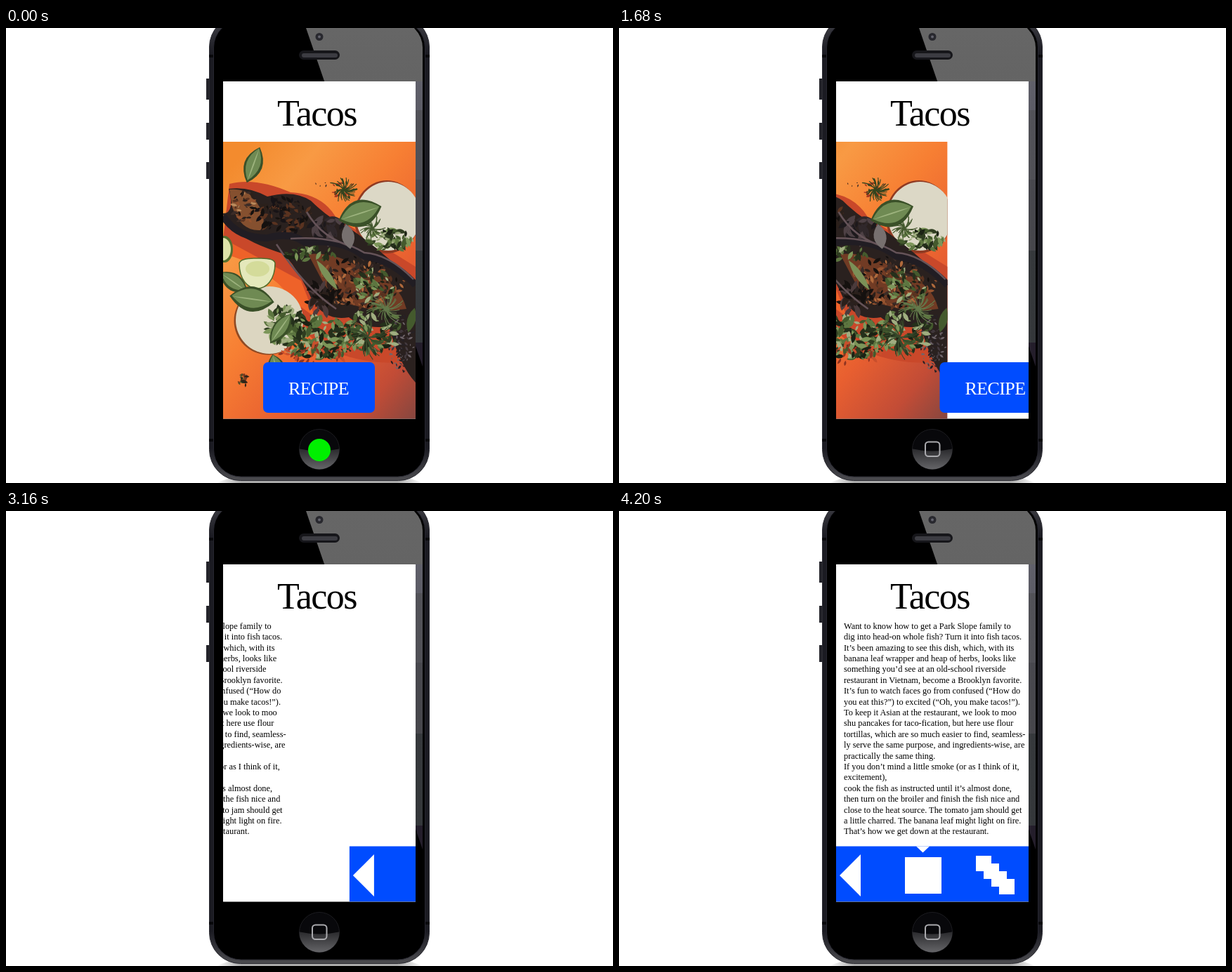
An HTML page that plays this animation: 864 px wide and 648 px high, repeating every 4800 ms.

```html
<!DOCTYPE html>
<html lang="en">
<head>
<meta charset="utf-8">
<title>Taco recipe on a phone</title>
<style>
  html, body { margin: 0; width: 100%; height: 100%; overflow: hidden; background: #fff; }
  svg { display: block; width: 864px; height: 648px; }
  text { font-family: "Liberation Serif", "Times New Roman", serif; }
</style>
</head>
<body>
<svg viewBox="0 0 864 648">
  <defs>
    <clipPath id="screen"><rect x="309" y="76" width="274" height="480.500"/></clipPath>
    <clipPath id="photoBox"><rect x="309" y="162" width="274" height="395"/></clipPath>
    <clipPath id="face"><rect x="297" y="-10" width="296" height="648" rx="38"/></clipPath>
    <clipPath id="home"><circle cx="446" cy="600" r="28.5"/></clipPath>
    <linearGradient id="gloss" gradientUnits="userSpaceOnUse" x1="0" y1="0" x2="0" y2="500">
      <stop offset="0" stop-color="#666"/><stop offset=".152" stop-color="#646464"/>
      <stop offset=".152" stop-color="#60606a"/><stop offset=".234" stop-color="#5c5c66"/>
      <stop offset=".234" stop-color="#525258"/><stop offset=".432" stop-color="#505056"/>
      <stop offset=".432" stop-color="#48484e"/><stop offset=".634" stop-color="#46464b"/>
      <stop offset=".634" stop-color="#36393c"/><stop offset=".896" stop-color="#34373a"/>
      <stop offset=".896" stop-color="#241e2b"/>
    </linearGradient>
    <linearGradient id="edge" x2="0" y2="1">
      <stop offset="0" stop-color="#44444a"/><stop offset=".08" stop-color="#1b1b22"/>
      <stop offset=".93" stop-color="#1b1b22"/><stop offset="1" stop-color="#4c4c50"/>
    </linearGradient>
    <linearGradient id="shine" x2="0" y2="1">
      <stop offset="0" stop-color="#29292c"/><stop offset="1" stop-color="#68686b"/>
    </linearGradient>
    <linearGradient id="floor">
      <stop offset="0" stop-color="#fff"/><stop offset=".12" stop-color="#aaa"/>
      <stop offset=".88" stop-color="#aaa"/><stop offset="1" stop-color="#fff"/>
    </linearGradient>
    <linearGradient id="orange" x1=".15" y1="0" x2="1" y2="1">
      <stop offset="0" stop-color="#f38b2e"/><stop offset=".18" stop-color="#f89a44"/>
      <stop offset=".4" stop-color="#f77f33"/><stop offset=".65" stop-color="#e85f30"/>
      <stop offset=".85" stop-color="#c24c36"/><stop offset="1" stop-color="#86463f"/>
    </linearGradient>
  </defs>

  <!-- Phone -->
  <path d="M300 648Q320 638 340 642H552Q572 638 592 648Z" fill="url(#floor)"/>
  <path d="M285 72h6v30h-6zM285 135h6v24h-6zM285 191h6v24h-6z" fill="#24242a"/>
  <rect x="289.500" y="-17" width="313" height="661.500" rx="44" fill="url(#edge)" stroke="#2a2a31"/>
  <path d="M289 40h8M595 40h8M289 587h8M595 587h8" stroke="#08080b" stroke-width="4"/>
  <rect x="295.500" y="-11" width="301" height="650" rx="39" fill="#000" stroke="#26262f"/>
  <path d="M427 0L593 482V0Z" fill="url(#gloss)" clip-path="url(#face)"/>
  <circle cx="446" cy="12.500" r="5.500" fill="#28282e"/>
  <circle cx="446" cy="12.500" r="2" fill="#62626c"/>
  <rect x="417" y="32" width="58" height="13" rx="6.500" fill="#16161a"/>
  <rect x="421" y="36" width="51" height="6" rx="3" fill="#3c3c42"/>
  <circle cx="446" cy="600" r="28.500" fill="#08080b" stroke="#1c1c20"/>
  <path d="M416 599Q446 606 476 599V630H416Z" fill="url(#shine)" clip-path="url(#home)"/>
  <rect x="436" y="589.500" width="20.500" height="20.500" rx="4.500" fill="none" stroke="#aaaaae" stroke-width="2"/>

  <g clip-path="url(#screen)">
    <rect x="309" y="76" width="274" height="481" fill="#fff"/>
    <text x="386" y="139" font-size="52" letter-spacing="-1.500">Tacos</text>

    <g id="photo">
      <g clip-path="url(#photoBox)">
        <rect x="309" y="162" width="274" height="395" fill="url(#orange)"/>
        <path d="M318 222Q355 212 405 234Q450 236 470 270L583 340V475Q520 482 470 462Q400 430 420 390L309 300Z" fill="#c9482a"/>
        <path d="M309 300L420 360L440 412L410 390Q370 335 309 322Z" fill="#ee6229"/>
        <ellipse cx="542" cy="269" rx="47" ry="52" fill="#8f3a22"/>
        <ellipse cx="544" cy="268" rx="46" ry="49" fill="#dcd8c6"/>
        <circle cx="373" cy="417" r="48.500" fill="#8f4a24"/>
        <circle cx="375" cy="416" r="48" fill="#dcd6c1"/>
        <ellipse cx="311" cy="315" rx="12" ry="19" fill="#55702f"/>
        <ellipse cx="309" cy="315" rx="11" ry="16" fill="#dde2a8"/>
        <path d="M317 229Q345 225 372 240Q410 230 434 246Q460 272 490 286Q535 316 583 365V505Q560 480 545 425Q510 430 488 412Q455 418 436 388Q420 350 396 322Q345 306 325 288Q309 274 309 264Q326 264 317 229Z" fill="#2a211f"/>
        <path d="M318 230Q340 228 352 242Q375 270 362 288Q335 290 322 255Z" fill="#85502f"/>
        <path d="M430 322Q470 318 510 345Q560 360 570 400Q530 406 500 396Q465 390 448 356Z" fill="#713b24"/>
        <g id="meat"></g>
        <path d="M309 268Q330 300 372 299Q405 290 425 305Q480 300 510 325Q550 330 583 366" fill="none" stroke="#211d23" stroke-width="10"/>
        <path d="M428 262Q450 300 495 312M405 300Q470 295 510 320Q545 322 580 358M385 308Q425 370 470 400" fill="none" stroke="#655358" stroke-width="2.500"/>
        <g id="herbs"></g>
        <path d="M332 335Q334 327 358 328Q382 327 383 335C383 383 332 383 332 335Z" fill="#e4e8bb" stroke="#526d2b" stroke-width="1.500"/>
        <ellipse cx="358" cy="343" rx="17" ry="11" fill="#d4db9a"/>
        <g id="basil"></g>
      </g>
    </g>

    <g id="button">
      <rect x="366" y="476" width="159" height="72" rx="7" fill="#004cff"/>
      <text x="402" y="521.500" font-size="26" letter-spacing="-.6" fill="#fff">RECIPE</text>
    </g>

    <g id="story" font-size="12.350"></g>

    <g id="bar">
      <rect x="309" y="477.500" width="274" height="79" fill="#004cff"/>
      <path d="M314 519L344 489V549Z M407 493h52v52h-52Z" fill="#fff"/>
      <path d="M508 491h22v11h11v11h11v11h11v22h-22v-11h-11v-11h-11v-11h-11Z" fill="#fff"/>
      <path id="notch" d="M423 477.500h19l-9.500 9Z" fill="#fff"/>
    </g>
  </g>

  <circle id="dot" cx="446" r="16" fill="#00f000"/>
</svg>

<script>
const $ = id => document.getElementById(id);
const clamp = (v, lo = 0, hi = 1) => Math.min(hi, Math.max(lo, v));

const lines = `Want to know how to get a Park Slope family to
dig into head-on whole fish? Turn it into fish tacos.
It’s been amazing to see this dish, which, with its
banana leaf wrapper and heap of herbs, looks like
something you’d see at an old-school riverside
restaurant in Vietnam, become a Brooklyn favorite.
It’s fun to watch faces go from confused (“How do
you eat this?”) to excited (“Oh, you make tacos!”).
To keep it Asian at the restaurant, we look to moo
shu pancakes for taco-fication, but here use flour
tortillas, which are so much easier to find, seamless-
ly serve the same purpose, and ingredients-wise, are
practically the same thing.
If you don’t mind a little smoke (or as I think of it,
excitement),
cook the fish as instructed until it’s almost done,
then turn on the broiler and finish the fish nice and
close to the heat source. The tomato jam should get
a little charred. The banana leaf might light on fire.
That’s how we get down at the restaurant.`.split("\n");
$("story").innerHTML = lines
  .map((line, i) => `<text x="320" y="${(167.8 + 15.4 * i).toFixed(1)}">${line}</text>`)
  .join("");

let seed = 11;
const random = () => (seed = seed * 16807 % 2147483647) / 2147483647;
const pick = list => list[Math.floor(random() * list.length)];

const leaf = (x, y, length, width, angle, fill) =>
  `<path transform="translate(${x} ${y}) rotate(${angle})" fill="${fill}"
    d="M${-length} 0Q0 ${-width * 2} ${length} 0Q0 ${width * 2} ${-length} 0Z"/>`;

// A large leaf with a lit face and a dark midrib
const basilLeaf = (x, y, length, width, angle) =>
  leaf(x, y, length, width, angle, "#3a5028") +
  leaf(x, y - 1, length * .9, width * .75, angle, "#6f8a53") +
  leaf(x, y, length * .9, 1, angle, "#9db37e");

// Scatters small leaves inside an ellipse
function scatter(cx, cy, rx, ry, count, size, colors) {
  let out = "";
  for (let i = 0; i < count; i++) {
    const a = random() * 2 * Math.PI, r = Math.sqrt(random());
    const length = size * (.5 + random());
    out += leaf(cx + rx * r * Math.cos(a), cy + ry * r * Math.sin(a),
      length, length * .4, random() * 360, pick(colors));
  }
  return out;
}

// Fans fine dill fronds out from one point
function dill(x, y, radius, color) {
  let d = "";
  for (let i = 0; i < 34; i++) {
    const a = random() * 2 * Math.PI, r = radius * (.5 + random() * .5);
    d += `M${x} ${y}q${r * Math.cos(a + .5) / 2} ${r * Math.sin(a + .5) / 2} ${r * Math.cos(a)} ${r * Math.sin(a)}`;
  }
  return `<path d="${d}" fill="none" stroke="${color}" stroke-width="1.1"/>`;
}

const greens = ["#25301b", "#2f3d20", "#445a2d", "#5d7640", "#7c9659", "#1b2214", "#a0ad80"];
const chars = ["#15110f", "#2b201b", "#5a3320", "#96532f", "#3c2c27"];
const ash = ["#262125", "#6f656a", "#443b40"];

$("meat").innerHTML =
  scatter(340, 255, 18, 22, 50, 3.5, [...chars, "#b98a5c"]) +
  scatter(395, 267, 40, 26, 110, 5, [...chars.slice(0, 3), "#171316"]) +
  scatter(455, 285, 30, 16, 30, 8, ["#1d191c", "#4e4145", "#30282b"]) +
  scatter(505, 362, 62, 36, 190, 4.5, [...chars, "#b06a3c"]) +
  scatter(452, 385, 24, 24, 45, 7, [...chars.slice(0, 2), "#4b3b3c"]) +
  scatter(563, 450, 18, 42, 110, 2.5, ash);

$("herbs").innerHTML =
  scatter(548, 302, 32, 14, 60, 6, greens) +
  scatter(432, 322, 36, 10, 40, 5, greens) +
  scatter(525, 368, 28, 22, 55, 5.5, greens) +
  scatter(398, 425, 27, 30, 75, 7, greens) +
  scatter(446, 440, 62, 30, 190, 6.5, greens) +
  scatter(440, 462, 55, 16, 45, 4, ["#c94f2c", "#8f3420"]) +
  scatter(524, 430, 36, 36, 85, 6, greens) +
  scatter(338, 502, 8, 9, 12, 4, ["#7c3b20", "#46552a", "#2e2418"]) +
  scatter(450, 222, 9, 8, 5, 1.5, chars) +
  scatter(480, 230, 16, 12, 20, 3, ["#a83a20", "#33421f"]) +
  dill(480, 230, 22, "#34441f") + dill(522, 285, 20, "#45592f") +
  dill(540, 400, 30, "#62784a") + dill(515, 440, 34, "#37492a");

$("basil").innerHTML =
  basilLeaf(352, 195, 27, 13, -70) +
  basilLeaf(504, 264, 32, 19, -18) +
  leaf(487, 297, 18, 9, 80, "#77706f") +
  basilLeaf(324, 362, 24, 12, 35) + basilLeaf(350, 386, 32, 18, 8) +
  leaf(457, 352, 26, 5, 55, "#7b9057") + basilLeaf(391, 428, 26, 11, -55) +
  basilLeaf(385, 486, 22, 13, 75) + leaf(577, 416, 18, 6, -75, "#445a2d");

const place = (id, x, y = 0) => $(id).setAttribute("transform", `translate(${x} ${y})`);
const show = (id, on) => $(id).style.display = on ? "" : "none";

function draw() {
  const t = Math.floor(performance.now() % 4800 / 40) * 40;

  // Finger dot travels from the home button to RECIPE and presses it
  const travel = clamp((t - 40) / 1000);
  show("dot", t < 1240);
  $("dot").setAttribute("cx", 446 - travel);
  $("dot").setAttribute("cy", 601 - 89.3 * travel);
  $("dot").setAttribute("r", 16 + 2.5 * clamp((t - 900) / 140));

  // Photo leaves to the left, button to the right
  show("photo", t < 2320);
  show("button", t < 2320);
  place("photo", -.2665 * Math.max(0, t - 1247));
  place("button", .2057 * Math.max(0, t - 1240));

  // Story and toolbar arrive from opposite sides
  const u = clamp((t - 2800) / 1120);
  const away = 274 * (1 - u - u * (1 - u) * (.834 * u - .167));
  show("story", t > 2800);
  show("bar", t > 2800);
  place("story", -away);
  place("bar", away);
  place("notch", 0, -9 * (1 - clamp((t - 3920) / 280)));

  requestAnimationFrame(draw);
}
draw();
</script>
</body>
</html>
```
